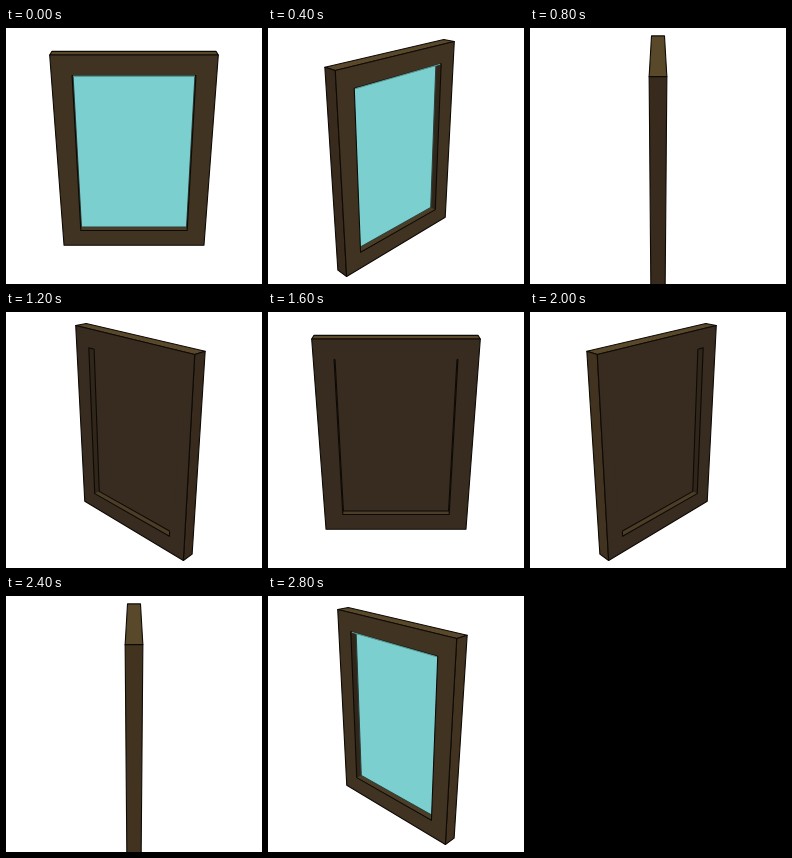
These frames come from a looping animation (256x256 px, 3.2 s). An HTML page with a canvas:

```html
<!DOCTYPE html>
<html lang="en">
<head>
<meta charset="utf-8">
<title>Turning window</title>
<style>
  html, body { margin: 0; width: 100%; height: 100%; overflow: hidden; background: #fff; }
  canvas { display: block; width: 100vw; height: 100vh; }
</style>
</head>
<body>
<canvas id="stage" width="256" height="256"></canvas>
<script>
const ctx = document.getElementById('stage').getContext('2d');

const STEP_MS = 400, STEPS = 8;
const HALF_W = 75.5, HALF_H = 103.5, HALF_D = 6.8, RAIL = 19;
const PITCH = 25.5 * Math.PI / 180, DISTANCE = 485;
const LINE = '#0d0a06', GLASS = '#7bcfcf';
const COLORS = {
  front: '#403322', back: '#382b1f', left: '#382a1c', right: '#41331f',
  top: '#5a482a', sill: '#4c3d27', jamb: '#30261a'
};

let yaw = 0;

// Perspective view from above onto a body turned about its vertical axis.
function project([x, y, z]) {
  const px = x * Math.cos(yaw) + z * Math.sin(yaw);
  const pz = z * Math.cos(yaw) - x * Math.sin(yaw);
  const py = y * Math.cos(PITCH) - pz * Math.sin(PITCH);
  const depth = pz * Math.cos(PITCH) + y * Math.sin(PITCH);
  const scale = DISTANCE / (DISTANCE - depth);
  return [128 + px * scale, 128 - py * scale];
}

// Corners run clockwise on screen: top left, top right, bottom right, bottom left.
// side is 1 for the front and -1 for the back.
function rect(w, h, z, side) {
  return [[-w, h], [w, h], [w, -h], [-w, -h]].map(([x, y]) => project([x * side, y, z * side]));
}

function trace(points) {
  ctx.beginPath();
  points.forEach(p => ctx.lineTo(p[0], p[1]));
  ctx.closePath();
}

function fill(points, color) {
  trace(points);
  ctx.fillStyle = color;
  ctx.fill();
}

function outline(points, color = LINE) {
  trace(points);
  ctx.strokeStyle = color;
  ctx.stroke();
}

function isVisible(points) {
  const area = points.reduce((sum, [x, y], i) => {
    const [nx, ny] = points[(i + 1) % points.length];
    return sum + x * ny - nx * y;
  }, 0);
  return area > 1;
}

function drawFace(points, color) {
  if (!isVisible(points)) return false;
  fill(points, color);
  outline(points);
  return true;
}

function drawOpening(side) {
  const w = HALF_W - RAIL, h = HALF_H - RAIL;
  const rim = rect(w, h, HALF_D, side);
  const pane = rect(w, h, 0, side);
  const isGlass = side > 0;

  ctx.save();
  trace(rim);
  ctx.clip();
  fill(rim, COLORS.jamb);
  fill([rim[3], rim[2], pane[2], pane[3]], COLORS.sill);
  if (isGlass) {
    fill(pane, GLASS);
    outline(pane, '#2d3d38');
  }
  ctx.restore();

  if (isGlass) {
    outline(rim);
    // The upper edge is only a soft shade against the glass.
    ctx.beginPath();
    ctx.moveTo(rim[0][0] + 1, rim[0][1] + 0.5);
    ctx.lineTo(rim[1][0] - 1, rim[1][1] + 0.5);
    ctx.strokeStyle = '#5b9893';
    ctx.stroke();
    return;
  }

  // The solid pane blends into the frame, hiding the rim edges in front of it.
  outline(rim);
  fill(pane, COLORS.back);
  ctx.save();
  trace(rim);
  ctx.clip();
  outline(pane);
  ctx.restore();
}

function drawWindow() {
  const front = rect(HALF_W, HALF_H, HALF_D, 1);
  const back = rect(HALF_W, HALF_H, HALF_D, -1);

  drawFace([back[1], back[0], front[1], front[0]], COLORS.top);
  drawFace([back[1], front[0], front[3], back[2]], COLORS.left);
  drawFace([front[1], back[0], back[3], front[2]], COLORS.right);
  if (drawFace(front, COLORS.front)) drawOpening(1);
  if (drawFace(back, COLORS.back)) drawOpening(-1);
}

function render(now) {
  const step = Math.floor(now / STEP_MS) % STEPS;
  yaw = step * 2 * Math.PI / STEPS;
  ctx.fillStyle = '#fff';
  ctx.fillRect(0, 0, 256, 256);
  ctx.lineWidth = 1.1;
  ctx.lineJoin = 'round';
  drawWindow();
}

const start = performance.now();
function tick() {
  render(performance.now() - start);
  requestAnimationFrame(tick);
}
tick();
</script>
</body>
</html>
```
